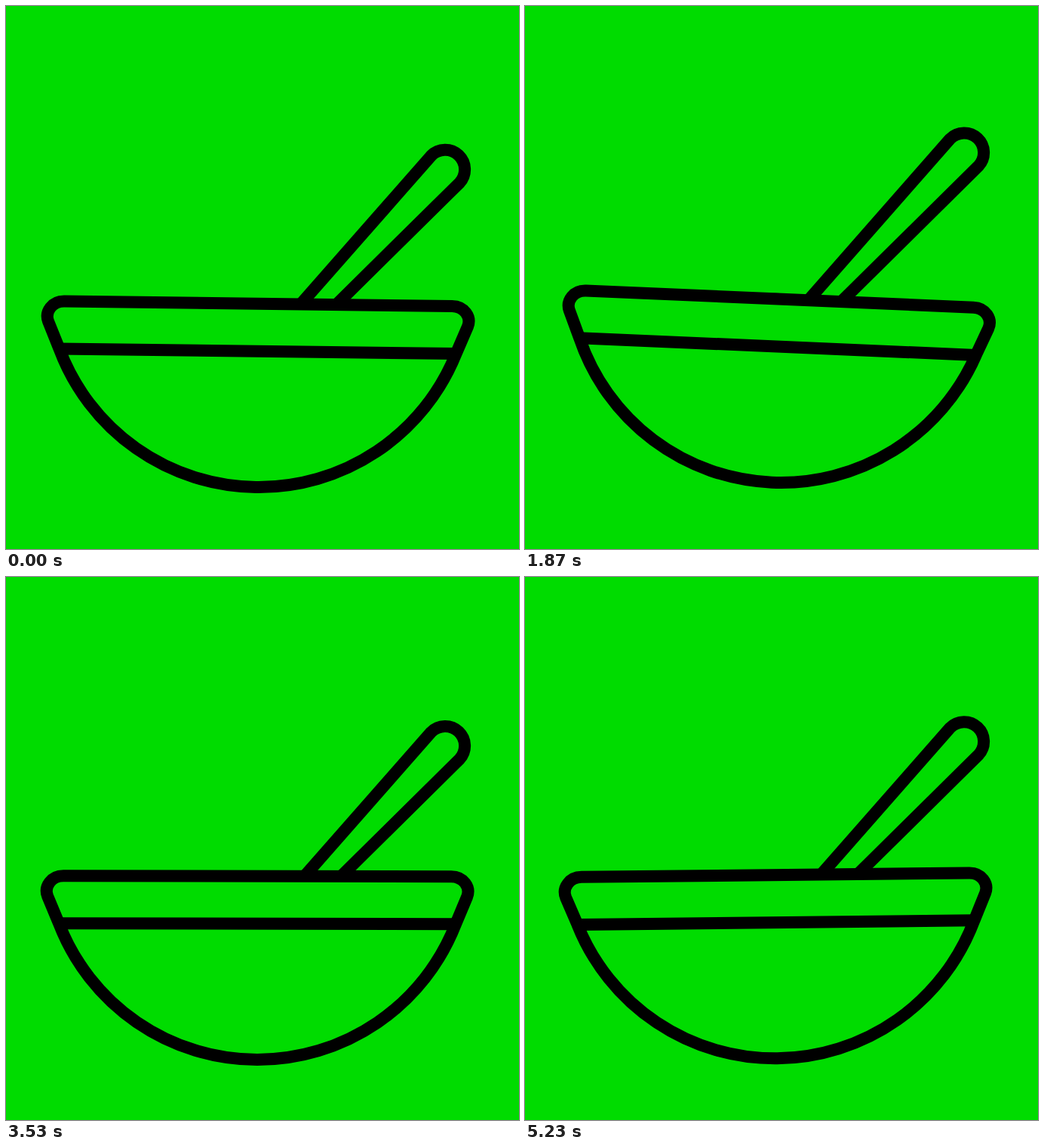
Write an HTML page that moves like this. It is 680 by 720 pixels and loops after 5260 ms.

```html
<!DOCTYPE html>
<html lang="en">
<head>
<meta charset="utf-8">
<title>Whisk and bowl</title>
<style>
  html, body { margin: 0; width: 100%; height: 100%; overflow: hidden; background: #00dc00; }
  svg { display: block; width: 100vw; height: 100vh; }
</style>
</head>
<body>
<svg viewBox="0 0 680 720" fill="none" stroke="#000" stroke-width="16">
  <g id="whisk">
    <path d="M372 424.7 L563.5 206.8 A26 26 0 0 1 601.3 242.5 L397 444.5"/>
    <g transform="translate(318 499) rotate(133.3)">
      <ellipse rx="86" ry="72"/>
      <ellipse rx="86" ry="39"/>
      <path d="M-86 0 H86"/>
    </g>
  </g>
  <g id="bowl">
    <path fill="#00dc00" d="M76 397 H590 C606 397 616 411 611 424 L596 460 A282 282 0 0 1 70 460 L55 424 C50 411 60 397 76 397 Z"/>
    <path d="M70 460 H596"/>
  </g>
</svg>
<script>
  const LOOP = 5260, FPS = 30;
  const PERIOD = 0.895, START_PHASE = 0.08;
  const WHISK_LIFT = 119, BOWL_LIFT = 33;
  const TILTS = [0, 5, -5, 0];
  const whisk = document.getElementById('whisk');
  const bowl = document.getElementById('bowl');

  const ease = u => u * u * (3 - 2 * u);

  // Eased interpolation through evenly spaced keys, phase 0..1
  function keyed(keys, phase) {
    const x = phase * (keys.length - 1);
    const i = Math.floor(x);
    return keys[i] + (keys[i + 1] - keys[i]) * ease(x - i);
  }

  function draw(ms) {
    const seconds = Math.floor((ms % LOOP + 5) * FPS / 1000) / FPS;
    const phase = (START_PHASE + seconds / PERIOD) % 1;
    const lift = keyed([0, 1, 0], phase);
    const tilt = keyed(TILTS, phase);
    whisk.setAttribute('transform', `translate(0 ${-WHISK_LIFT * lift})`);
    bowl.setAttribute('transform', `translate(0 ${-BOWL_LIFT * lift}) rotate(${tilt} 333 505)`);
  }

  const start = performance.now();
  function tick() {
    draw(performance.now() - start);
    requestAnimationFrame(tick);
  }
  tick();
</script>
</body>
</html>
```
